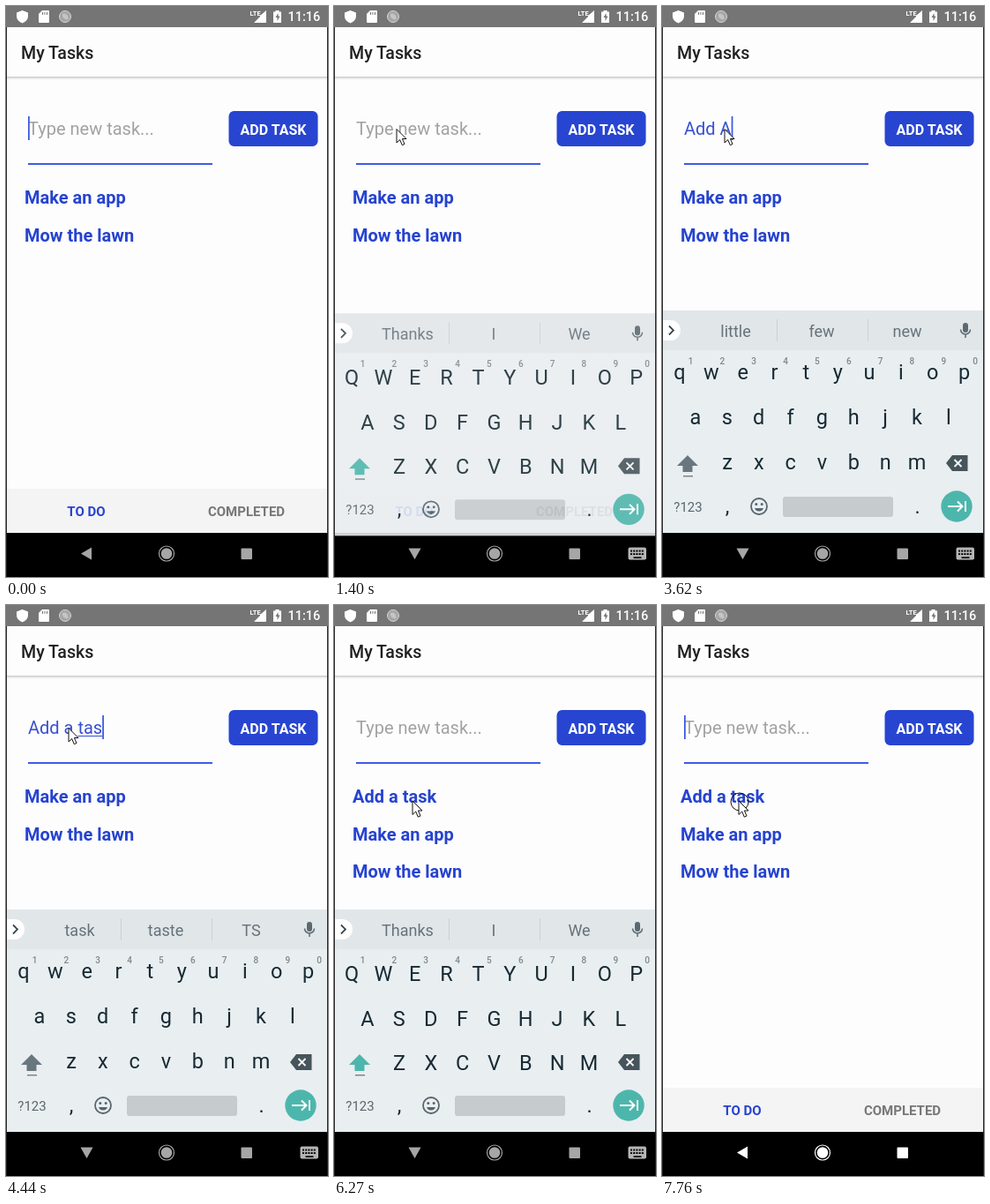
Animation, 365 px wide and 647 px high, one loop 8000 ms. Source, as an HTML page:

```html
<!DOCTYPE html>
<html lang="en">
<head>
<meta charset="utf-8">
<title>My Tasks</title>
<style>
html, body { margin: 0; width: 100%; height: 100%; overflow: hidden; background: #fdfdfd; }
svg { display: block; width: 365px; height: 647px; font-family: Roboto, sans-serif; }
text { white-space: pre; }
.mid { text-anchor: middle; }
.task { font-size: 20px; font-weight: 700; fill: #2643cf; }
.tab { font-size: 15px; font-weight: 600; text-anchor: middle; }
.sug { font-size: 18px; fill: #66727a; text-anchor: middle; }
.key { font-size: 23.5px; fill: #162a33; text-anchor: middle; }
.num { font-size: 10px; font-weight: 500; fill: #7d888e; text-anchor: middle; }
</style>
</head>
<body>
<svg viewBox="0 0 365 647">
  <rect width="365" height="647" fill="#fdfdfd"/>

  <rect y="80" width="365" height="1" fill="#cfcfcf"/>
  <rect y="81" width="365" height="1" fill="#dedede"/>
  <rect y="82" width="365" height="1.5" fill="#f1f1f1"/>
  <text x="17" y="60" font-size="19.6" font-weight="500" fill="#212121">My Tasks</text>

  <g fill="#fff">
    <rect width="365" height="24" fill="#757575"/>
    <path d="M18.5 5L25 7.5V11.5Q25 17 18.5 19.5Q12 17 12 11.5V7.5Z"/>
    <path d="M41 5H48Q49 5 49 6V18Q49 19 48 19H38Q37 19 37 18V9Z"/>
    <path d="M41.5 7v3M44 7v3M46.5 7v3" stroke="#757575"/>
    <circle cx="67" cy="12" r="6.5" fill="#a5a5a5" stroke="#d4d4d4"/>
    <path d="M64 9A4.5 4.5 0 0 1 70 15A5 5 0 0 1 64 9" fill="#c4c4c4"/>
    <text x="276.5" y="11" font-size="7.5" font-weight="700">LTE</text>
    <path d="M295 5V19H281L288 12V11Z"/>
    <path d="M305.5 5h4v1.5h2.5V19h-9V6.500h2.500z"/>
    <path d="M308.500 8l-3 5h2v4l3-5.500h-2z" fill="#757575"/>
    <text x="319.500" y="17" font-size="14.5" font-weight="500">11:16</text>
  </g>

  <text id="hint" x="25" y="146" font-size="20" fill="#a2a2a2">Type new task...</text>
  <text id="entry" x="25" y="146" font-size="20" fill="#3650d3"></text>
  <rect id="under" y="148" height="1" fill="#3650d3"/>
  <rect id="caret" y="125" width="1.8" height="27" fill="#3f5be0"/>
  <rect x="25" y="178" width="209" height="2" fill="#3f5be6"/>
  <rect x="252.500" y="119" width="101" height="40" rx="6" fill="#2745d1"/>
  <text class="mid" x="303" y="146" font-size="16" font-weight="700" fill="#fff">ADD TASK</text>

  <g id="tasks"></g>

  <rect y="547" width="365" height="50" fill="#f4f4f4"/>
  <text class="tab" x="91" y="578" fill="#2643cf">TO DO</text>
  <text class="tab" x="272.500" y="578" fill="#777">COMPLETED</text>
  <rect y="597" width="365" height="50" fill="#000"/>

  <g id="board">
    <rect y="345" width="365" height="252" fill="#e9eef1"/>
    <rect y="345" width="365" height="45" fill="#e1e6e9"/>
    <path d="M0 356H9.500A11.500 11.500 0 0 1 9.500 379H0Z" fill="#fff"/>
    <path d="M8 362.500l5 5l-5 5" fill="none" stroke="#37474f" stroke-width="1.800"/>
    <g id="sugs"><path d="M130.500 355v25M233.500 355v25" stroke="#cbd1d4"/></g>
    <rect x="341" y="359" width="6" height="11" rx="3" fill="#5c6970"/>
    <path d="M338.500 366.500a5.500 5.500 0 0 0 11 0M344 372v4" fill="none" stroke="#5c6970" stroke-width="1.500"/>
    <g id="keys"></g>
    <path id="shift" d="M29 509L41 521H34.500V528H23.500V521H17Z"/>
    <rect x="24" y="532" width="11" height="1.500" fill="#7b868c"/>
    <path d="M329 509H346.500V527H329L322 518Z" fill="#46545b"/>
    <path d="M331.500 514l8 8m0-8l-8 8" stroke="#fff" stroke-width="1.800"/>
    <text class="mid" x="29.500" y="572.500" font-size="15" fill="#59666d">?123</text>
    <text class="key" x="74" y="575">,</text>
    <text class="key" x="289.500" y="575">.</text>
    <circle cx="110" cy="567" r="9" fill="none" stroke="#59666d" stroke-width="1.800"/>
    <circle cx="106.800" cy="564.500" r="1.500" fill="#59666d"/>
    <circle cx="113.200" cy="564.500" r="1.500" fill="#59666d"/>
    <path d="M105 569a5.300 5.300 0 0 0 10 0z" fill="#59666d"/>
    <rect x="137" y="556" width="125" height="23" rx="3" fill="#c6cbce"/>
    <circle cx="334" cy="567" r="17.700" fill="#4db6ac"/>
    <path d="M324 567h16M335 561.500l5.500 5.500l-5.500 5.500M344 561v12" fill="none" stroke="#fff" stroke-width="2"/>
  </g>

  <rect id="ripple" x="39" y="597" width="105" height="49" rx="24.500" fill="#222"/>
  <g id="nav">
    <path id="back"/>
    <circle cx="182" cy="620.500" r="6.300"/>
    <circle cx="182" cy="620.500" r="8.500" fill="none" stroke-width="1.200"/>
    <rect x="266.500" y="614.500" width="12.500" height="12.500" rx="1"/>
  </g>
  <g id="kbIcon">
    <rect x="333.500" y="613.500" width="20.500" height="14" rx="2" fill="#b5b5b5"/>
    <path d="M336 617.500h16M336 621h16" stroke="#000" stroke-width="2" stroke-dasharray="2 1.200"/>
    <path d="M339.500 625h9" stroke="#000" stroke-width="1.600"/>
  </g>
  <path d="M.5 24V647M364.500 24V647" stroke="#222"/>

  <g id="mouse">
    <circle id="ring" cx="1" cy="1" r="10" fill="none" stroke="#111"/>
    <path d="M0 0V15.500L3.700 12L6.300 18.200L9 17L6.400 11H11Z" fill="#fff" stroke="#111" stroke-linejoin="round"/>
  </g>
</svg>
<script>
const NS = 'http://www.w3.org/2000/svg', LOOP = 8000, LEFT = 25;
const $ = id => document.getElementById(id);
const show = (id, on) => $(id).setAttribute('visibility', on ? 'visible' : 'hidden');
const within = (t, a, b) => t >= a && t < b;

function label(parent, cls, x, y, str = '') {
  const el = document.createElementNS(NS, 'text');
  el.setAttribute('class', cls);
  el.setAttribute('x', x);
  el.setAttribute('y', y);
  el.textContent = str;
  return $(parent).appendChild(el);
}

const taskRows = [224, 266.5, 309].map(y => label('tasks', 'task', 21, y));
const sugTexts = [83.5, 181, 278].map(x => label('sugs', 'sug', x, 374.5));

const keys = [];
['qwertyuiop', 'asdfghjkl', 'zxcvbnm'].forEach((row, r) => {
  [...row].forEach((ch, i) => {
    const x = [20, 38, 74][r] + i * 35.85;
    const y = [425.5, 476.5, 527][r];
    keys.push({ el: label('keys', 'key', x, y), ch, y });
    if (!r) label('keys', 'num', x + 12.5, 406, (i + 1) % 10);
  });
});

// time, entry, composing word start (-1: none), suggestions
const START = 'Thanks,I,We';
const typing = [
  [0, '', -1, START],
  [2230, 'A', 0, 'A,And,As'],
  [2470, 'Ad', 0, 'Ad,Add,Ads'],
  [2650, 'Add', 0, 'Add,Adds,Ads'],
  [2800, 'Add ', -1, 'a,the,to'],
  [2980, 'Add A', 4, 'A,And,All'],
  [3190, 'Add A', -1, 'little,few,new'],
  [3680, 'Add a t', 6, 'to,the,two'],
  [3890, 'Add a ta', 6, 'ta,take,tax'],
  [4290, 'Add a tas', 6, 'task,taste,TS'],
  [4530, 'Add a task', 6, 'task,taste,TS'],
  [5600, '', -1, START],
  [7330, '', -1, ',,']
];

// start, end, steps, target x, target y
const moves = [
  [450, 1250, 15, 71, 139.5],
  [5030, 5480, 8, 285, 140],
  [5900, 6270, 7, 89, 222],
  [6610, 7090, 9, 92, 619],
  [7210, 7330, 2, 95, 567],
  [7390, 7700, 6, 87, 222]
];

const caretOff = [[270, 770], [1250, 1730], [5030, 5530], [6100, 6600], [7100, 7600]];
const clicks = [[1250, 1340], [5600, 5690], [7090, 7150], [7760, LOOP]];
const inAny = (t, spans) => spans.some(s => within(t, ...s));

function mousePos(t) {
  let x = 342, y = 609;
  for (const [a, b, n, tx, ty] of moves) {
    if (t < a) break;
    const p = Math.min(1, (Math.floor((t - a) / (b - a) * (n - 1) + 1e-6) + 1) / n);
    const e = p * p * (3 - 2 * p);
    x += (tx - x) * e;
    y += (ty - y) * e;
  }
  return [x, y];
}

function boardLevel(t) {
  const ramp = from => Math.min(1, Math.max(0, Math.floor((t - from) / 60) / 3));
  return t < 7330 ? ramp(1280) : 1 - ramp(7330);
}

function drawEntry(t) {
  const [, str, from, words] = typing.filter(s => s[0] <= t).pop();
  const entry = $('entry');
  entry.textContent = str;
  const width = n => n ? entry.getSubStringLength(0, n) : 0;
  const end = width(str.length);
  show('hint', !str);
  show('under', from >= 0);
  if (from >= 0) {
    $('under').setAttribute('x', LEFT + width(from));
    $('under').setAttribute('width', end - width(from));
  }
  $('caret').setAttribute('x', LEFT + end);
  show('caret', !inAny(t, caretOff));
  words.split(',').forEach((w, i) => { sugTexts[i].textContent = w; });
  show('sugs', words !== ',,');
}

function drawBoard(t) {
  const level = boardLevel(t), gap = (1 - level) ** 2;
  $('board').setAttribute('opacity', level ? 1 - gap : 0);
  $('board').setAttribute('transform', `translate(0 ${30 * gap})`);
  const lower = within(t, 2290, 5600);
  for (const { el, ch, y } of keys) {
    el.textContent = lower ? ch : ch.toUpperCase();
    el.setAttribute('y', lower ? y - 2.5 : y);
  }
  $('shift').setAttribute('fill', lower ? '#68777f' : '#4db6ac');
}

function drawNav(t) {
  const up = within(t, 1340, 7330);
  const tone = t < 7330 ? '#a6a6a6' : t < 7390 ? '#d0d0d0' : '#fff';
  $('nav').setAttribute('fill', tone);
  $('nav').setAttribute('stroke', 'none');
  $('nav').children[2].setAttribute('stroke', tone);
  $('back').setAttribute('d', up ? 'M84.500 614.500H98.500L91.500 627Z' : 'M97 613.500V627.500L85 620.500Z');
  show('kbIcon', up);
  const rise = (t - 7100) / 120, fall = (7600 - t) / 200;
  $('ripple').setAttribute('opacity', Math.max(0, Math.min(1, rise, fall)));
}

function draw(t) {
  drawEntry(t);
  drawBoard(t);
  drawNav(t);
  const list = ['Make an app', 'Mow the lawn'];
  if (t >= 5660) list.unshift('Add a task');
  taskRows.forEach((el, i) => { el.textContent = list[i] || ''; });
  $('mouse').setAttribute('transform', `translate(${mousePos(t).join(' ')})`);
  show('mouse', t >= 450);
  show('ring', inAny(t, clicks));
}

const begin = performance.now();
function tick() {
  draw((performance.now() - begin) % LOOP);
  requestAnimationFrame(tick);
}
tick();
</script>
</body>
</html>
```
